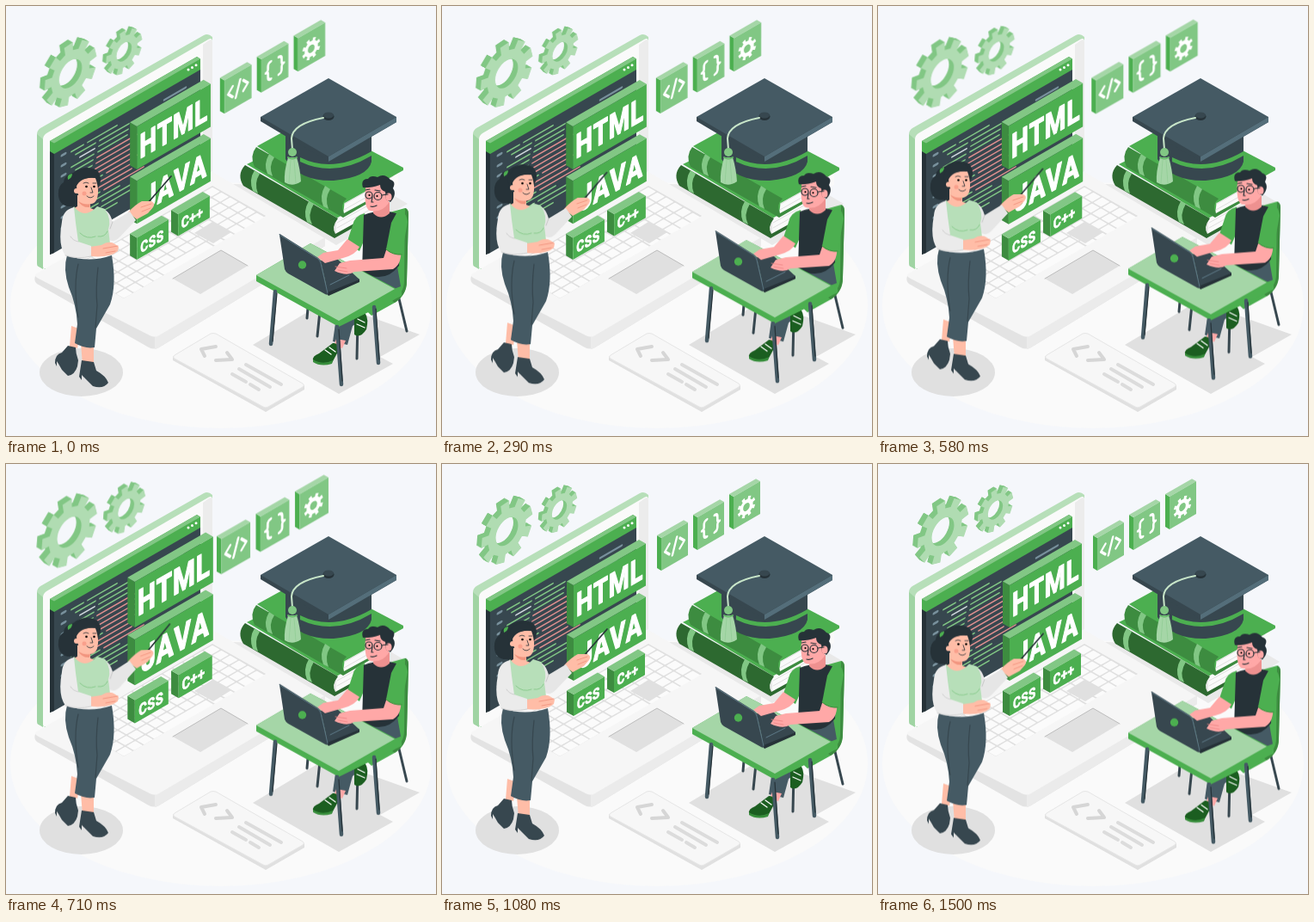
Write an HTML page that moves like this. It is 500 px wide and 500 px high and loops after 1540 ms.

```html
<!DOCTYPE html>
<html lang="en">
<head>
<meta charset="utf-8">
<title>Programming course</title>
<style>
html, body { margin: 0; width: 100%; height: 100%; overflow: hidden; background: #f5f7fb; }
svg { display: block; width: 100vw; height: 100vh; }
text { font-family: Roboto, sans-serif; font-weight: 700; font-kerning: none; fill: #fff; stroke: #fff; stroke-linejoin: round; }
.pulse { animation: pulse 1540ms ease-in-out infinite; }
.float { animation: float 1540ms linear infinite; }
.point { animation: point 1540ms ease-in-out infinite; transform-origin: 116px 250px; }
#gears { transform-origin: 98.5px 70px; }
#tiles { transform-origin: 310px 73px; }
#signs { transform-origin: 191px 190px; }
@keyframes float { 50% { transform: translateY(-10px); } }
@keyframes pulse {
  0%, 100% { transform: scale(1.02); }
  8%, 43.5% { transform: scale(1.09); }
  24%, 34%, 57%, 97.5% { transform: scale(1); }
}
@keyframes point {
  0%, 24%, 34%, 57%, 100% { transform: rotate(0deg); }
  8%, 43.5% { transform: rotate(-2deg); }
}
.line { fill: none; stroke-linecap: round; stroke-linejoin: round; }
.dark { fill: #263238; }
.ink { fill: #37474f; }
.slate { fill: #455a64; }
.skin { fill: #ffa8a7; }
.peach { fill: #ffbda7; }
.leaf { fill: #4caf50; }
.mint { fill: #a5d6a7; }
.pale { fill: #b7dfb9; }
.shade { fill: #e0e0e0; }
</style>
</head>
<body>
<svg viewBox="0 0 500 500">
  <ellipse cx="250" cy="348" rx="245" ry="143" fill="#fafafa"/>

  <!-- big laptop -->
  <path d="M34 314L172 384 371 267V279L178 397Q172 400 166 397L36 323Q32 320 34 314Z" fill="#e3e3e3"/>
  <path d="M173 384L371 267V279L178 397Q175 399 173 399Z" fill="#ebebeb"/>
  <path d="M36 311L240 193 371 269 178 383Q173 386 167 383L36 316Q32 313 36 311Z" fill="#f6f6f6"/>
  <path d="M75 305L240 209 302 244 137 340Z" class="shade"/>
  <g id="keys" transform="matrix(.866 -.5 .866 .5 75 305)"></g>
  <path d="M219 264L240 251 262 263 241 276Z" class="shade"/>
  <path d="M194 317L250 284 281 302 226 335Z" fill="#e0e0e0"/>
  <path d="M194 317L250 284 281 302" class="line" stroke="#bdbdbd"/>

  <path d="M36 149Q36 145 40 142L230 34Q235 31 240 36V60L46 172V306L38 303Q36 302 36 299Z" class="pale"/>
  <path d="M36 149L43 155V306L38 303Q36 302 36 299Z" fill="#a0d4a3"/>
  <path d="M43 155Q43 151 47 148L235 39Q240 36 240 42V190L46 305Q43 306 43 302Z" fill="#fafafa"/>
  <path d="M229 45L236 40Q240 38 240 42V192L229 198Z" fill="#ececec"/>
  <path d="M51 158L222 59.500 226 62V189L56 287 51 289Z" class="ink"/>
  <path d="M51 168L56 171V287L51 289Z" class="dark"/>
  <path d="M51 157L222 59 226 61.500V74L56 172 51 169Z" class="leaf"/>
  <path d="M51 157L222 59 226 61.500 56 159.500Z" fill="#81c784"/>
  <g fill="#fff"><circle cx="212" cy="74" r="1.500"/><circle cx="216.500" cy="71.400" r="1.500"/><circle cx="221" cy="68.800" r="1.500"/></g>
  <g id="lines" transform="matrix(1 -.577 0 1 56 172)" class="line" stroke-width="1.700"></g>

  <!-- note card -->
  <path d="M194 407V412L302 472 347 446V441L302 466Z" class="shade"/>
  <path d="M196 406L238 381Q241 380 244 381L345 439Q348 441 345 443L305 466Q302 468 299 466L196 410Q193 408 196 406Z" fill="#f7f7f7" stroke="#e6e6e6"/>
  <path d="M244 396L227 399 231 407M244 412L263 411 257 403" class="line" stroke="#d6d6d6" stroke-width="4" stroke-linejoin="miter" stroke-linecap="butt"/>
  <path d="M279 417L320 440M271 422L307 443M263 428L279 437M284 440L294 446" class="line" stroke="#dcdcdc" stroke-width="4" stroke-linecap="butt"/>

  <!-- books -->
  <path d="M264 207L384 278 467 230 440 214Z" fill="#e9e9e9"/>
  <path d="M280 184L350 150 448 212 386 247Z" class="leaf"/>
  <path d="M384 247L446 212V230L384 265Z" fill="#fafafa"/>
  <path d="M385 252L446 218M385 258L446 224" class="line" stroke="#e0e0e0"/>
  <path d="M278 185L386 247Q378 257 383 265L430 239V243L382 270 276 209Q268 196 278 185Z" fill="#2d6930"/>
  <path d="M289 191L295 195Q288 206 293 218L287 215Q282 202 289 191ZM352 227L358 230Q350 243 356 254L350 251Q345 239 352 227Z" fill="#81c784"/>
  <path d="M394 225L456 190V208L392 243Z" fill="#fafafa"/>
  <path d="M394 230L450 198M393 237L450 205" class="line" stroke="#e0e0e0"/>
  <path d="M292 163L352 130 462 188V191L394 229Z" class="leaf"/>
  <path d="M291 164L396 224Q388 231 393 241L430 221V224L392 246 289 187Q283 174 291 164Z" fill="#3d8c40"/>
  <path d="M306 172L312 176Q305 186 310 198L304 195Q299 184 306 172ZM371 209L377 213Q370 224 375 236L369 233Q364 221 371 209Z" fill="#81c784"/>

  <!-- graduation cap -->
  <path d="M325 146V178Q341 204 381 203 421 199 425 181V146Z" class="ink"/>
  <path d="M342 176Q380 195 425 169V174Q382 200 342 181Z" class="leaf"/>
  <path d="M296 129V134L375 181 454 135V129Z" class="ink"/>
  <path d="M375 175L454 129V135L375 181Z" fill="#546e7a"/>
  <path d="M296 129L375 84 454 129 375 175Z" class="slate"/>
  <ellipse cx="375" cy="128.500" rx="6.500" ry="4.500" class="dark"/>
  <ellipse cx="375" cy="127" rx="6" ry="3.500" class="ink"/>
  <path d="M369 130Q333 137 332 154L333 167" class="line" stroke="#c8e6c9" stroke-width="2"/>
  <path d="M328 176Q323 193 324 205 333 211 343 204 342 189 338 176Z" class="mint"/>
  <path d="M331 179L329 206M335 179L337 206" class="line" stroke="#8fcc92" stroke-width=".7"/>
  <circle cx="333" cy="170" r="5" fill="#81c784"/>
  <path d="M328 176Q333 179 338 176" class="line" stroke="#66bb6a" stroke-width="2"/>

  <g id="gears" class="pulse"></g>
  <g id="tiles" class="pulse"></g>
  <g id="signs" class="pulse"></g>

  <path d="M287 394L372 343 481 382 435 408 450 416 387 451Z" class="shade"/>
  <ellipse cx="87.500" cy="426" rx="48.500" ry="28" class="shade"/>

  <!-- student -->
  <g class="float">
    <path d="M366 345L362 384M409 365L408 410M455 332L466 378M352 340L350 363" class="line" stroke="#37474f" stroke-width="3"/>
    <path d="M446 240L464 235Q468 236 468 242L466 320Q466 336 452 345L425 360 404 340Z" class="leaf"/>
    <path d="M464 235Q468 236 468 242L466 320Q466 336 452 345L449 343Q463 334 463 320Z" fill="#3d8c40"/>
    <path d="M384 362L414 350 418 362 403 372 397 394 380 390Z" class="slate"/>
    <path d="M384 387L395 389 391 398 381 396Z" class="skin"/>
    <path d="M380 392Q388 391 386 402L379 415Q368 419 357 412 356 407 364 404Z" fill="#1b5e20"/>
    <path d="M357 411Q368 418 380 412L379 416Q366 420 357 414Z" fill="#388e3c"/>
    <path d="M405 364Q411 355 418 358 422 364 419 376 412 387 405 382Z" fill="#1b5e20"/>
    <path d="M371 400L378 405M376 397L383 402M409 364L417 368M408 370L417 374" class="line" stroke="#fff" stroke-width="1.300"/>
    <path d="M412 302L455 303 459 326 438 334 410 322Z" class="slate"/>
    <path d="M417 241Q405 244 403 255L396 276 411 285 421 262Z" class="leaf"/>
    <path d="M416 243Q438 234 459 243L457 302Q440 324 414 309Z" class="dark"/>
    <path d="M428 228H446V241Q436 250 427 241Z" fill="#ee9190"/>
    <g transform="translate(-2 0)">
      <path d="M420 212Q421 203 434 204L447 210 447 229Q439 241 425 238 418 235 420 212Z" class="skin"/>
      <path d="M417 211Q414 201 423 201 426 196 434 199 442 194 449 202 456 204 452 212 457 219 449 228L444 225 443 216Q437 214 437 208 425 212 417 211Z" class="dark"/>
      <ellipse cx="447" cy="222" rx="3.500" ry="4.500" class="skin"/>
      <g class="line" stroke="#263238" stroke-width="1.200"><circle cx="424" cy="220" r="4"/><circle cx="434.500" cy="221" r="4.500"/><path d="M439 220L446 219M420 214L425 213M431 214L437 215M426 233Q429 234 433 232M428 222L427 228 429 228"/></g>
      <circle cx="424.500" cy="220" r="1.100"/><circle cx="433.500" cy="221" r="1.100"/>
    </g>

    <path d="M291 313L354 276 460 332V337L387 373 291 320Z" class="leaf"/>
    <path d="M291 313L354 276 452 329 387 366Z" class="mint"/>
    <path d="M313 332L308 393M385 373L390 440M428 350L433 415" class="line" stroke="#455a64" stroke-width="4.500"/>
    <path d="M315 334L310 390M387 376L391 436M430 352L434 411" class="line" stroke="#263238" stroke-width="1.200"/>

    <path d="M371 332L379 295 411 318V321L375 337Z" class="dark"/>
    <path d="M366 296L384 293 411 318 374 333Z" class="ink"/>
    <path d="M377 324L399 313" class="line" stroke="#607d8b"/>
    <path d="M397 271L411 280Q407 289 392 293L371 299 362 292 369 287 386 284Z" class="skin"/>
    <path d="M459 281Q461 300 450 306L405 309Q397 315 382 308L388 299 400 296 439 293 444 278Z" class="skin"/>
    <path d="M383 303L396 305M386 307L397 309" class="line" stroke="#ee8584" stroke-width=".8"/>
    <path d="M454 241Q465 236 467 251L460 289Q450 290 442 283L448 252Z" class="leaf"/>
    <path d="M442 283Q450 290 460 289" class="line" stroke="#388e3c"/>
    <path d="M318 266Q317 264 320 266L363 293Q366 295 367 299L374 334Q374 337 371 335L328 311Q325 309 324 306Z" class="ink"/>
    <path d="M318 266L363 294Q365 296 366 299L374 334" class="line" stroke="#607d8b" stroke-width=".9"/>
    <circle cx="344.500" cy="301" r="4.700" class="leaf"/>
  </g>

  <!-- teacher -->
  <g class="float">
    <path d="M76 372L87 376 83 398 74 396ZM87 392H102V416L89 417Z" class="peach"/>
    <path d="M72 395L81 397Q81 404 84 412L83 419Q80 429 72 430L65 423 61 416 59 413V419L57 415Q57 405 65 403Z" class="ink"/>
    <path d="M88 412L102 414 105 424Q116 430 119 438 113 446 101 442L91 432 88 429V435L85 431Z" class="ink"/>
    <path d="M71 290Q96 299 123 290 129 324 121 347L105 375 103 397Q92 399 80 392L83 370Q82 348 73 327 66 306 71 290Z" class="slate"/>
    <path d="M107 304Q104 330 106 348L104 374M84 300Q78 325 84 362" class="line" stroke="#37474f" stroke-width="1.200"/>
    <path d="M78 194Q92 184 106 191 113 200 108 210L99 229Q87 240 76 233 63 234 61 221 60 209 67 205 67 197 78 194Z" class="dark"/>
    <path d="M83 220H98V235L108 239Q92 252 76 237L83 233Z" class="peach"/>
    <path d="M82 210Q84 198 104 200 109 213 106 224 102 233 93 229 83 225 82 210Z" class="peach"/>
    <path d="M84 227Q92 232 98 230L97 234Q89 235 84 227Z" fill="#f2957f"/>
    <path d="M79 217Q82 202 96 200 106 198 108 205 107 191 95 190 82 190 76 205Z" class="dark"/>
    <path d="M72 202Q70 196 77 195 77 200 72 202Z" class="leaf"/>
    <circle cx="82" cy="215" r="3" class="peach"/>
    <circle cx="93.500" cy="210" r="1.300"/><circle cx="102.500" cy="210" r="1.300"/>
    <path d="M90 206Q93 204 96 206M101 206L105 206M99 211L101 217 98 217M94 221Q98 225 102 221" class="line" stroke="#263238" stroke-width=".8"/>
    <circle cx="91" cy="218" r="2.500" fill="#f9a08c"/>

    <g class="point">
      <path d="M164 230L192 198" class="line" stroke="#263238" stroke-width="1.700"/>
      <path d="M142 240Q150 231 158 227L169 227Q174 229 171 234L165 241 152 248Z" class="peach"/>
      <path d="M157 234L169 230M158 239L168 235" class="line" stroke="#f2957f" stroke-width=".9"/>
      <path d="M109 235Q120 236 124 251L144 239 151 249 132 269Q123 278 116 267Z" fill="#e6e6e6"/>
      <path d="M124 251L121 259" class="line" stroke="#c8c8c8"/>
    </g>
    <path d="M79 233Q91 249 106 233L115 236Q123 248 119 260L121 276Q96 287 76 277L72 244Z" class="pale"/>
    <path d="M86 264Q94 272 104 268M107 268Q115 269 118 262" class="line" stroke="#81c784" stroke-width=".8"/>
    <path d="M98 280L111 278Q120 272 127 277L131 280 130 285Q121 293 98 291Z" class="peach"/>
    <path d="M113 282L130 279M116 287L127 285" class="line" stroke="#f2957f" stroke-width=".9"/>
    <path d="M79 234Q66 237 65 251 60 278 69 290 83 295 99 291V279L84 274 81 252Z" fill="#ebebeb"/>
    <path d="M84 274Q78 273 75 268M69 290Q83 295 99 291" class="line" stroke="#d0d0d0"/>
  </g>
</svg>
<script>
const $ = id => document.getElementById(id);
const SLOPE = 0.577;
const iso = (x, y, k = 0.866) => `transform="matrix(${k} ${-k * SLOPE} 0 1 ${x} ${y})"`;
const poly = (points, fill) => `<polygon points="${points.join(' ')}" fill="${fill}"/>`;

// Upright slab; (x, y) is the top left corner of its front
function slab(x, y, w, h, d, [front, side, top]) {
  const up = w * SLOPE, back = d * SLOPE;
  return poly([x, y, x - d, y - back, x - d, y - back + h, x, y + h], side)
    + poly([x, y, x - d, y - back, x + w - d, y - up - back, x + w, y - up], top)
    + poly([x, y, x + w, y - up, x + w, y - up + h, x, y + h], front);
}

function gearPath(R, hole, teeth, turn) {
  const pts = [];
  for (let i = 0; i < teeth; i++) {
    const a = turn + i * 2 * Math.PI / teeth;
    for (const [da, r] of [[-0.2, 0.74], [-0.17, 1], [0.17, 1], [0.2, 0.74]]) {
      pts.push(`${(R * r * Math.cos(a + da)).toFixed(2)} ${(R * r * Math.sin(a + da)).toFixed(2)}`);
    }
  }
  return `M${pts.join('L')}ZM${hole} 0A${hole} ${hole} 0 1 0 ${-hole} 0A${hole} ${hole} 0 1 0 ${hole} 0Z`;
}
const gear = (x, y, R, hole, fill, teeth = 9, turn = -0.25) =>
  `<path d="${gearPath(R, hole, teeth, turn)}" fill="${fill}" fill-rule="evenodd" ${iso(x, y)}/>`;

function thickGear(x, y, R, hole, depth) {
  let out = '';
  for (let d = depth; d > 0; d -= 0.5) out += gear(x - d, y - d * SLOPE, R, hole, '#82c785');
  return out + gear(x, y, R, hole, '#b0dcb2');
}
$('gears').innerHTML = thickGear(75.5, 78.5, 34.5, 15, 5.5) + thickGear(136.5, 53.5, 24, 10, 4);

const soft = ['#81c784', '#4caf50', '#a5d6a7'];
const glyph = (x, y, d) =>
  `<path d="${d}" class="line" stroke="#fff" stroke-width="3" ${iso(x, y)}/>`;
$('tiles').innerHTML = [0, 1, 2].map(i => slab(255 + 42 * i, 86 - 24 * i, 31, 38, 5, soft)).join('')
  + glyph(270.5, 95.5, 'M-7-6L-13 0-7 6M7-6L13 0 7 6M3-9L-3 9')
  + glyph(312.5, 72, 'M-5-10Q-9-10-9-6V-3Q-9 0-12 0-9 0-9 3V6Q-9 10-5 10M5-10Q9-10 9-6V-3Q9 0 12 0 9 0 9 3V6Q9 10 5 10')
  + gear(354, 50, 12, 4.4, '#fff', 8, 0.39);

const bright = ['#4caf50', '#3d8c40', '#82c785'];
const label = (str, x, y, size, k) =>
  `<text font-size="${size}" letter-spacing="${size / 38}" stroke-width="${size / 25}" ${iso(x, y, k)}>${str}</text>`;
$('signs').innerHTML = slab(153, 141, 84, 49, 8, bright) + slab(153, 203, 84, 49, 8, bright)
  + slab(153, 268, 36, 25, 8, bright) + slab(200, 241, 36, 25, 8, bright)
  + label('HTML', 156, 178, 38, 0.72) + label('JAVA', 160, 239, 38, 0.72)
  + label('CSS', 157, 285.5, 17, 0.8) + label('C++', 203.5, 258, 17, 0.8);

let keys = '';
for (let row = 0; row < 6; row++) {
  for (let col = 0; col < 14; col++) {
    const space = row === 5 && col > 3 && col < 9;
    if (space && col > 4) continue;
    keys += `<rect x="${col * 13.6 + 1}" y="${row * 11.9 + 1}" width="${space ? 66 : 11.8}" height="10.2" rx="1" fill="#fbfbfb"/>`;
  }
}
$('keys').innerHTML = keys;

// Code rows: line number, a short word, then a long stroke
const dash = (x, y, w, color) => `<path d="M${x} ${y}h${w}" stroke="${color}"/>`;
let rows = '';
for (let i = 0; i < 16; i++) {
  const y = 9 + i * 6, x = 20 + i % 3 * 5, w = 14 + (i * 13) % 5 * 3;
  const red = i > 3 && i < 12;
  if (i % 2 === 0) rows += `<path d="M9 ${y - 2}h4" stroke="#78909c" stroke-width="3"/>`;
  rows += dash(x, y, w, i % 4 === 2 ? '#cfd8dc' : '#81c784')
    + dash(x + w + 5, y, red ? 46 : 34, red ? '#e08f8f' : '#81c784');
}
for (let i = 0; i < 3; i++) rows += `<path d="M${128 + i * 3} ${11 + i * 7}h${25 - i * 6}" stroke="#78909c" stroke-width="2.500"/>`;
$('lines').innerHTML = rows;
</script>
</body>
</html>
```
